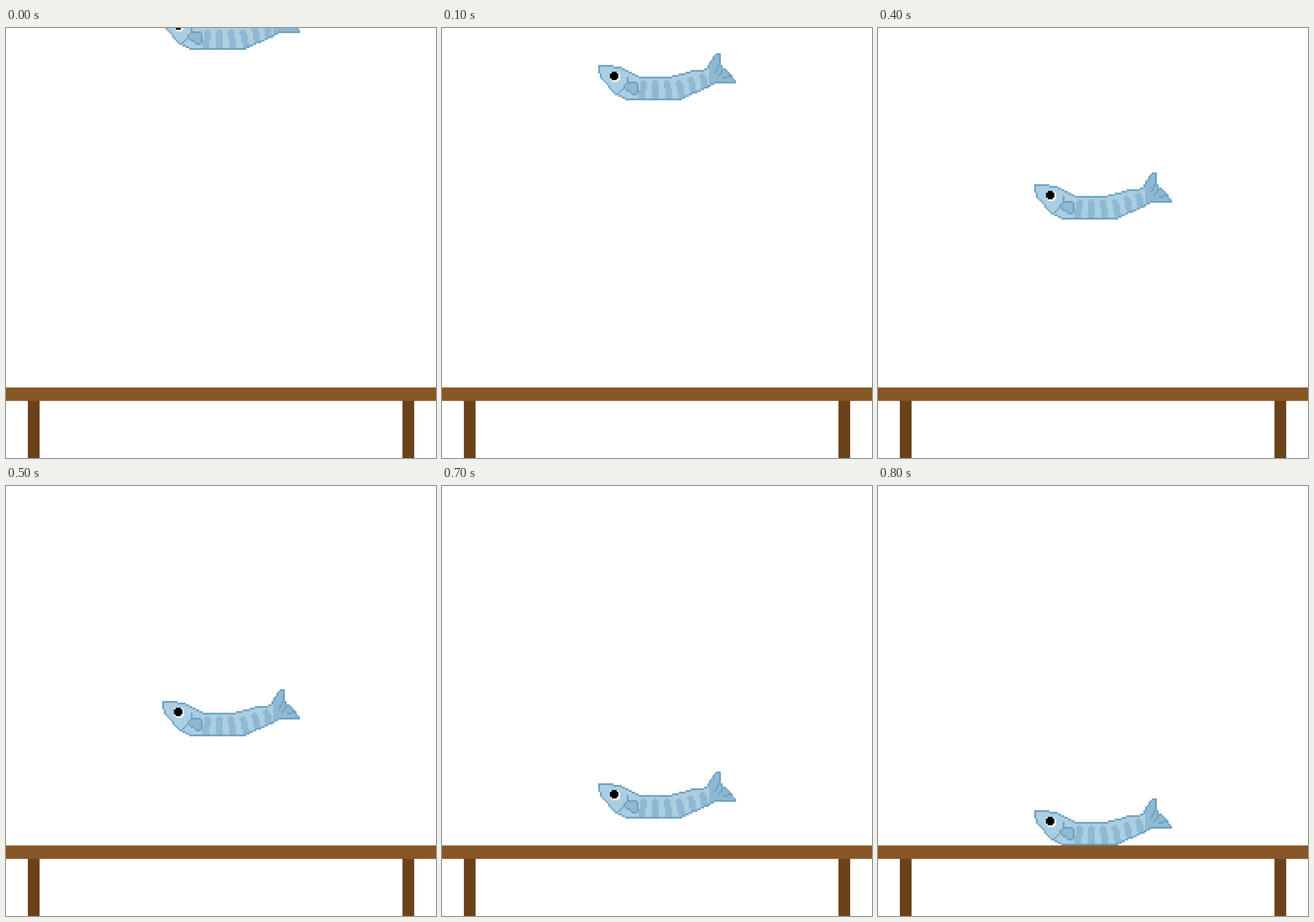
Animation, 748 px wide and 748 px high, one loop 0.9 s. Source, as an HTML page with a canvas:

```html
<!DOCTYPE html>
<html lang="en">
<head>
<meta charset="utf-8">
<title>Falling fish</title>
<style>
  html, body { margin: 0; width: 100%; height: 100%; overflow: hidden; background: #fff; }
  canvas { display: block; width: 100vw; height: 100vh; }
</style>
</head>
<body>
<canvas id="stage" width="768" height="768"></canvas>
<script>
const ctx = document.getElementById('stage').getContext('2d');
ctx.scale(3, 3); // the scene is a grid of 256 by 256 cells

const EDGE = '#6a9fbf', LIGHT = '#abcee2', SHADE = '#8fb8d2';
const STEP = 100;
const HEIGHTS = [-15, 15, 45, 45, 86, 121, 154, 170, 186]; // top of the fish at each step

const BODY = `0,7 8,7 9,8 13,8 25,14 42,14 45,13 54,11 55,10 62,10 65,8 66,5 70,0 72,0 72,5
  73,8 76,10 79,13 79,14 81,16 81,17 69,17 68,18 48,27 17,27 10,24 1,14 0,10 0,7`;
const FIN = '17,17 22,17 23,18 23,23 22,24 20,24 15,20 15,19 17,17';
const GILL = ['17,14 17,16', '15,20 11,24'];
const TAIL_RAYS = ['72,6 69,11', '74,9 71,13', '78,13 74,14'];
const TAIL_START = 66;

function rect(color, x, y, w, h) {
  ctx.fillStyle = color;
  ctx.fillRect(x, y, w, h);
}

// All grid cells along a polyline.
function trace(path) {
  const points = path.split(/\s+/).map(p => p.split(',').map(Number));
  return points.slice(1).flatMap(([endX, endY], i) => {
    const [x, y] = points[i], dx = endX - x, dy = endY - y;
    const steps = Math.max(Math.abs(dx), Math.abs(dy));
    return Array.from({ length: steps + 1 }, (_, s) =>
      [Math.round(x + dx * s / steps), Math.round(y + dy * s / steps)]);
  });
}

function stroke(path) {
  for (const [x, y] of trace(path)) rect(EDGE, x, y, 1, 1);
}

function fill(path, color, fromColumn = 0) {
  const columns = {};
  for (const [x, y] of trace(path)) (columns[x] ||= []).push(y);
  for (const x in columns) {
    if (x < fromColumn) continue;
    const top = Math.min(...columns[x]), bottom = Math.max(...columns[x]);
    rect(color, +x, top, 1, bottom - top + 1);
  }
}

// Stripes lean further and rise with the bend towards the tail.
function drawStripes() {
  for (let i = 0; i < 6; i++) {
    const bend = Math.max(0, i - 3), lean = Math.min(i - 1, 2) / 10;
    for (let row = 0; row < 11 - bend; row++) {
      const inset = row === 0 ? 1 : 0;
      rect(SHADE, 25 + 7 * i + Math.round(row * lean) + inset, 16 - 2 * bend + row, 4 - 2 * inset, 1);
    }
  }
}

function drawEye() {
  rect('#fff', 7, 11, 5, 5);
  rect('#fff', 12, 12, 1, 4);
  rect('#fff', 8, 16, 4, 1);
  rect('#000', 8, 11, 3, 5);
  rect('#000', 7, 12, 5, 3);
}

function drawFish(top) {
  ctx.save();
  ctx.translate(93, top);
  fill(BODY, LIGHT);
  drawStripes();
  fill(BODY, SHADE, TAIL_START);
  fill(FIN, SHADE);
  [BODY, FIN, ...GILL, ...TAIL_RAYS].forEach(stroke);
  drawEye();
  ctx.restore();
}

function drawTable() {
  for (const x of [13, 236]) rect('#6b421a', x, 222, 7, 34);
  rect('#875626', 0, 214, 256, 8);
}

const start = performance.now();
function frame() {
  const step = Math.floor((performance.now() - start) / STEP) % HEIGHTS.length;
  rect('#fff', 0, 0, 256, 256);
  drawTable();
  drawFish(HEIGHTS[step]);
  requestAnimationFrame(frame);
}
frame();
</script>
</body>
</html>
```
